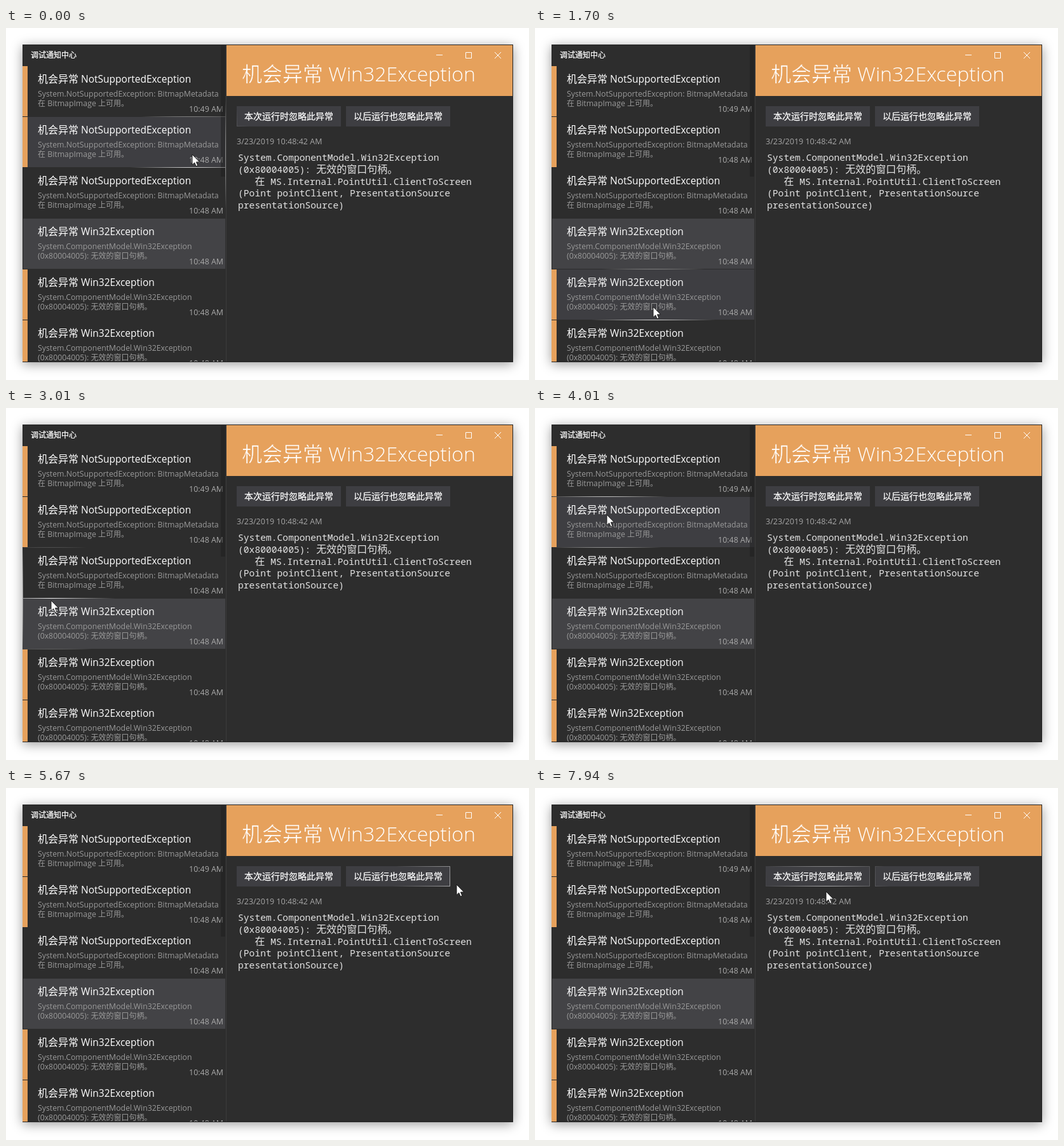
These frames come from a looping animation (823x554 px, 8000 ms). An HTML page:

```html
<!DOCTYPE html>
<html lang="zh">
<head>
<meta charset="utf-8">
<title>调试通知中心</title>
<style>
  html, body { margin: 0; width: 100%; height: 100%; overflow: hidden; background: #fff; }
  #window {
    position: absolute; left: 26px; top: 26px; width: 772px; height: 500px;
    background: #2d2d2d; box-shadow: 0 3px 17px rgba(0, 0, 0, .4);
  }
  svg { position: absolute; left: 0; top: 0; display: block; }
  text { font-family: "Open Sans", "Noto Sans", sans-serif; white-space: pre; }
  .cjk { font-family: "Noto Sans CJK SC", "Noto Sans CJK", sans-serif; }
  .mono { font-family: "Noto Sans Mono", "DejaVu Sans Mono", monospace; }
  .light { font-weight: 350; }
  /* thins the heavier Chinese strokes to match the light Latin */
  .light .cjk { stroke: #e6a15c; stroke-width: .7px; }
  .strong { stroke: #fff; stroke-width: .25px; }
</style>
</head>
<body>
<div id="window"></div>
<svg width="823" height="554" viewBox="0 0 823 554">
  <defs>
    <radialGradient id="glow" gradientUnits="userSpaceOnUse" cx="0" cy="0" r="100">
      <stop offset="0" stop-color="#fff" stop-opacity=".95"/>
      <stop offset="1" stop-color="#fff" stop-opacity="0"/>
    </radialGradient>
    <clipPath id="listClip"><rect x="26" y="27" width="321" height="498"/></clipPath>
  </defs>
  <rect x="26.5" y="26.5" width="771" height="499" fill="none" stroke="#222" stroke-opacity=".6"/>
  <g id="list" clip-path="url(#listClip)"></g>
  <rect x="346" y="27" width="1" height="498" fill="#3c3c3c"/>
  <g id="detail"></g>
  <g id="reveal"></g>
  <path id="cursor" d="M0 0V16.4L3.7 12.9 6.2 18.6 8.8 17.5 6.4 11.9H11.6Z"
        fill="#fff" stroke="#111" stroke-width=".9"/>
</svg>
<script>
const $ = id => document.getElementById(id);
const LOOP = 8000, FIRST_STEP = 205, STEP = 77.6;
const ROW_TOP = 60, ROW_H = 80;
const ORANGE = '#e6a15c', IDLE = '#3e3e42', SELECTED = '#434346';

const rect = (x, y, w, h, fill, extra = '') =>
  `<rect x="${x}" y="${y}" width="${w}" height="${h}" fill="${fill}" ${extra}/>`;

// Latin text at `size`, Chinese runs at `cjkSize`
function label(x, y, str, size, cjkSize, fill, extra = '') {
  const body = str.replace(/[\u3000-\u9fff]+/g,
    run => `<tspan class="cjk" font-size="${cjkSize}">${run}</tspan>`);
  return `<text x="${x}" y="${y}" font-size="${size}" fill="${fill}" ${extra}>${body}</text>`;
}

const notSupported = ['NotSupportedException',
  'System.NotSupportedException: BitmapMetadata', '在 BitmapImage 上可用。'];
const win32 = ['Win32Exception',
  'System.ComponentModel.Win32Exception', '(0x80004005): 无效的窗口句柄。'];
const rows = Array.from({ length: 6 }, (_, i) => ({
  y: ROW_TOP + i * ROW_H,
  msg: i < 3 ? notSupported : win32,
  time: i ? '10:48 AM' : '10:49 AM',
  unread: i < 2 || i > 3,
  selected: i === 3
}));

$('list').innerHTML = label(39, 47, '调试通知中心', 12, 12, '#fff', 'class="strong"') +
  rows.map(({ y, msg, time, unread, selected }, i) =>
    rect(27, y, 318, 79, selected ? SELECTED : IDLE, `id="row${i}"`) +
    (unread ? rect(26, y, 8, 79, ORANGE) : '') +
    label(50, y + 26, '机会异常 ' + msg[0], 15.5, 16, '#fff') +
    label(50, y + 48, msg[1], 12.3, 12, '#9a9a9a') +
    label(50, y + 63, msg[2], 12.3, 12, '#9a9a9a') +
    label(342, y + 72, time, 12.4, 12, '#aaa', 'text-anchor="end"')
  ).join('') + rect(338, 28, 7, 206, '#1e1e1e', 'opacity=".5"');

const buttons = [
  { x: 363, caption: '本次运行时忽略此异常' },
  { x: 535, caption: '以后运行也忽略此异常' }
];
const stack = [
  'System.ComponentModel.Win32Exception',
  '(0x80004005): 无效的窗口句柄。',
  '   在 MS.Internal.PointUtil.ClientToScreen',
  '(Point pointClient, PresentationSource',
  'presentationSource)'
];

$('detail').innerHTML = rect(347, 27, 450, 80, ORANGE) +
  label(371, 84, '机会异常 Win32Exception', 32, 32, '#fff', 'class="light"') +
  `<path d="M677 42.5H687M723.5 38.5H732.5V47.5H723.5ZM769 38L779 48M779 38L769 48"
    fill="none" stroke="#fff"/>` +
  buttons.map(({ x, caption }, i) => rect(x, 123, 164, 32, IDLE, `id="btn${i}"`) +
    label(x + 82, 144, caption, 14, 14, '#fff', 'class="strong" text-anchor="middle"')).join('') +
  label(363, 183, '3/23/2019 10:48:42 AM', 12.5, 12, '#a6a6a6') +
  stack.map((line, i) =>
    label(365, 209 + i * 18.75, line, 14.667, 16, '#e2e2e2', 'class="mono"')).join('');

// Borders lit by the pointer; unread bars hide the left edge of their rows
const edges = rows.map(({ y, unread }, i) => {
  const end = Math.min(y + ROW_H, 525);
  return (i ? `M27 ${y - .5}H345` : '') + `M345.5 ${y}V${end}` +
    (unread ? '' : `M26.5 ${y}V${end}`);
}).join('');
$('reveal').innerHTML = `<path d="${edges}" fill="none" stroke="url(#glow)"/>` +
  buttons.map(({ x }) => rect(x + .5, 123.5, 163, 31, 'none',
    'stroke="url(#glow)" stroke-opacity=".62"')).join('');

// Turning points and rests of the pointer: step, x, y
const path = [
  [0, 293, 199], [10, 176, 212], [19, 186, 439], [25, 262, 488], [32, 150, 345],
  [36, 71, 303], [43, 70, 225], [49, 113, 168], [54, 280, 170], [65, 545, 155],
  [70, 709, 152], [73, 708, 166], [80, 632, 137], [84, 632, 137], [87, 628, 151],
  [88, 628, 151], [94, 505, 141], [97, 505, 141], [99, 458, 163], [101, 458, 163]
];

function slope(i, axis) {
  const a = path[Math.max(i - 1, 0)], b = path[Math.min(i + 1, path.length - 1)];
  return (b[axis] - a[axis]) / (b[0] - a[0]);
}

// Smooth cubic through the points, still where two neighbours coincide
function pointerAt(step) {
  const i = path.findIndex((p, k) => step < path[k + 1][0]);
  const a = path[i], b = path[i + 1], span = b[0] - a[0];
  if (a[1] === b[1] && a[2] === b[2]) return [a[1], a[2]];
  const u = (step - a[0]) / span, v = 1 - u;
  return [1, 2].map(k => Math.round(
    a[k] * v * v * (1 + 2 * u) + b[k] * u * u * (3 - 2 * u) +
    span * u * v * (slope(i, k) * v - slope(i + 1, k) * u)));
}

function draw(now) {
  const step = Math.max(0, Math.floor((now % LOOP - FIRST_STEP) / STEP) );
  const [x, y] = pointerAt(step);
  $('cursor').setAttribute('transform', `translate(${x} ${y})`);
  $('glow').setAttribute('cx', x);
  $('glow').setAttribute('cy', y);

  const over = x >= 26 && x < 346 ? Math.floor((y - ROW_TOP) / ROW_H) : -1;
  rows.forEach((row, i) =>
    $('row' + i).setAttribute('opacity', row.selected || i === over ? 1 : 0));

  const pressed = step === 96 || step === 97;
  buttons.forEach((button, i) => {
    const inside = x >= button.x && x < button.x + 164 && y >= 123 && y < 155;
    $('btn' + i).setAttribute('fill', !inside ? IDLE : pressed ? '#58585a' : '#666');
  });
}

const start = performance.now();
function tick() {
  draw(performance.now() - start);
  requestAnimationFrame(tick);
}
tick();
</script>
</body>
</html>
```
